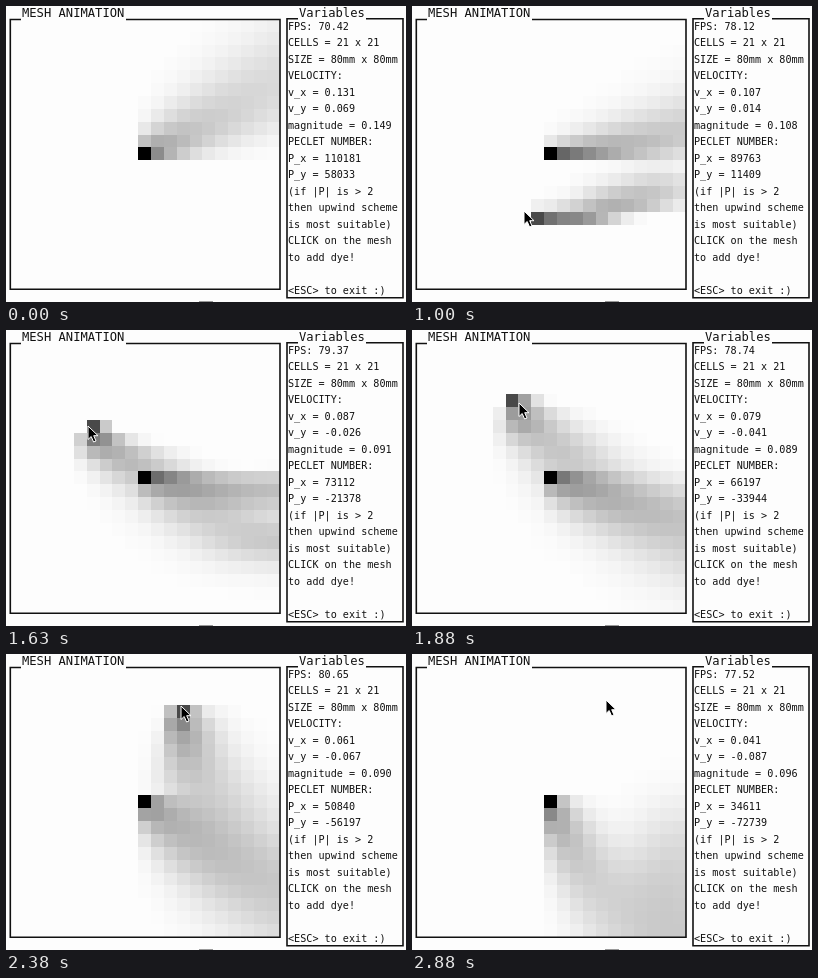
Animation, 400 px wide and 296 px high, one loop 3.01 s. Source, as an HTML page with a canvas:

```html
<!DOCTYPE html>
<html lang="en">
<head>
<meta charset="utf-8">
<title>Mesh animation</title>
<style>
html, body { margin: 0; width: 100%; height: 100%; overflow: hidden; background: #fdfdfd; }
canvas { display: block; }
</style>
</head>
<body>
<canvas id="stage" width="400" height="296"></canvas>
<script>
const ctx = document.getElementById('stage').getContext('2d');
const LOOP = 3010, STEPS = 24, N = 21, CELL = 270 / N, LEFT = 3.6, TOP = 12.8;
const DX = 0.08 / N, SUBSTEPS = 10, DT = 0.125 / SUBSTEPS;
const PECLET_PER_SPEED = DX * 1000 * 220000;
const DYE = 0.68, PAINT_START = 6, PAINT_END = 19.2, PAINT_LAG = 0.3;

// step, frame time in ms, Peclet x, Peclet y
const flowKeys = [
  [0, 14.2, 110181, 58033], [4, 11.9, 101076, 36887], [8, 12.8, 89763, 11409],
  [11, 12.4, 80027, -8813], [15, 12.7, 66197, -33944], [19, 12.4, 50840, -56197],
  [23, 12.9, 34611, -72739]
];
// step, x, y
const mouseKeys = [
  [2, 234, 272], [3, 225, 222], [4, 218, 178], [6, 188, 187], [7, 150, 209],
  [8, 112, 205], [9, 84, 195], [10, 74, 152], [11, 77, 129], [13, 82, 96],
  [14, 90, 79], [15, 107, 73], [17, 140, 61], [18, 165, 56], [19, 175, 52],
  [21, 190, 48], [23, 194, 46]
];

// Piecewise linear, extended past both ends
function sample(keys, step) {
  let i = 0;
  while (i < keys.length - 2 && step > keys[i + 1][0]) i++;
  const a = keys[i], b = keys[i + 1], f = (step - a[0]) / (b[0] - a[0]);
  return a.slice(1).map((v, j) => v + (b[j + 1] - v) * f);
}

// First-order upwind advection
function advect(c, vx, vy) {
  const at = (x, y) => x < 0 || y < 0 || y >= N ? 0 : c[y * N + x];
  const from = vy > 0 ? 1 : -1, kx = vx * DT / DX, ky = Math.abs(vy) * DT / DX;
  return c.map((v, i) => {
    const x = i % N, y = (i - x) / N;
    return v + kx * (at(x - 1, y) - v) + ky * (at(x, y + from) - v);
  });
}

function simulate() {
  const grids = [];
  let c = new Float64Array(N * N);
  for (let s = -8 * SUBSTEPS; s <= (STEPS - 1) * SUBSTEPS; s++) {
    const step = s / SUBSTEPS, [, px, py] = sample(flowKeys, step);
    c = advect(c, px / PECLET_PER_SPEED, py / PECLET_PER_SPEED);
    c[10 * N + 10] = DYE;
    const pen = step - PAINT_LAG;
    if (pen > PAINT_START && pen < PAINT_END) {
      const [x, y] = sample(mouseKeys, pen);
      const i = Math.floor((y - TOP) / CELL) * N + Math.floor((x - LEFT) / CELL);
      c[i] = Math.max(c[i], DYE + 0.03);
    }
    if (s >= 0 && s % SUBSTEPS === 0) grids.push(c.slice());
  }
  return grids;
}

function drawMesh(c) {
  const edge = (start, i) => Math.round(start + i * CELL);
  c.forEach((v, i) => {
    if (v < 0.004) return;
    const col = i % N, row = (i - col) / N, x = edge(LEFT, col), y = edge(TOP, row);
    const g = col === 10 && row === 10 ? 0 : Math.round(253 * (1 - Math.min(v, 1)));
    ctx.fillStyle = `rgb(${g},${g},${g})`;
    ctx.fillRect(x, y, edge(LEFT, col + 1) - x, edge(TOP, row + 1) - y);
  });
}

function drawPanel(title, x, y, w, h, textX, textW) {
  ctx.strokeStyle = '#111';
  ctx.lineWidth = 1.6;
  ctx.beginPath();
  ctx.moveTo(textX - 1, y);
  ctx.lineTo(x, y);
  ctx.lineTo(x, y + h);
  ctx.lineTo(x + w, y + h);
  ctx.lineTo(x + w, y);
  ctx.lineTo(textX + textW, y);
  ctx.stroke();
  ctx.fillStyle = '#111';
  ctx.font = '12.15px "DejaVu Sans Mono", monospace';
  ctx.fillText(title, textX, 10.5);
}

function drawReadout(step) {
  const [ms, px, py] = sample(flowKeys, step);
  const vx = px / PECLET_PER_SPEED, vy = py / PECLET_PER_SPEED;
  const fps = 1000 / (Math.round(ms * 10) / 10) - 1e-6;
  ctx.font = '10.15px "DejaVu Sans Mono", monospace';
  [
    `FPS: ${fps.toFixed(2)}`, 'CELLS = 21 x 21', 'SIZE = 80mm x 80mm',
    'VELOCITY:', `v_x = ${vx.toFixed(3)}`, `v_y = ${vy.toFixed(3)}`,
    `magnitude = ${Math.hypot(vx, vy).toFixed(3)}`,
    'PECLET NUMBER:', `P_x = ${Math.round(px)}`, `P_y = ${Math.round(py)}`,
    '(if |P| is > 2', 'then upwind scheme', 'is most suitable)',
    'CLICK on the mesh', 'to add dye!', '', '<ESC> to exit :)'
  ].forEach((line, i) => ctx.fillText(line, 282, 23.6 + i * 16.5));
}

function drawCursor(step) {
  if (step < mouseKeys[0][0]) return;
  const [x, y] = sample(mouseKeys, step);
  ctx.save();
  ctx.translate(x, y);
  ctx.fillStyle = '#000';
  ctx.strokeStyle = '#fff';
  ctx.lineWidth = 1;
  const arrow = new Path2D('M0 0V13.5L3.2 10.5L5.6 16L8 15L5.7 9.7H10Z');
  ctx.fill(arrow);
  ctx.stroke(arrow);
  ctx.restore();
}

const grids = simulate();

function draw(now) {
  const step = Math.min(STEPS - 1, Math.floor(Math.floor(now % LOOP / 10) / 12.5));
  ctx.fillStyle = '#fdfdfd';
  ctx.fillRect(0, 0, 400, 296);
  drawMesh(grids[step]);
  drawPanel('MESH ANIMATION', 4.3, 13.5, 269.7, 269.7, 16, 104);
  drawPanel('Variables', 281, 12.8, 116, 279, 293, 67);
  drawReadout(step);
  ctx.fillStyle = '#999';
  ctx.fillRect(193, 295, 14, 1);
  drawCursor(step);
}

const start = performance.now();
function tick() {
  draw(performance.now() - start);
  requestAnimationFrame(tick);
}
tick();
</script>
</body>
</html>
```
